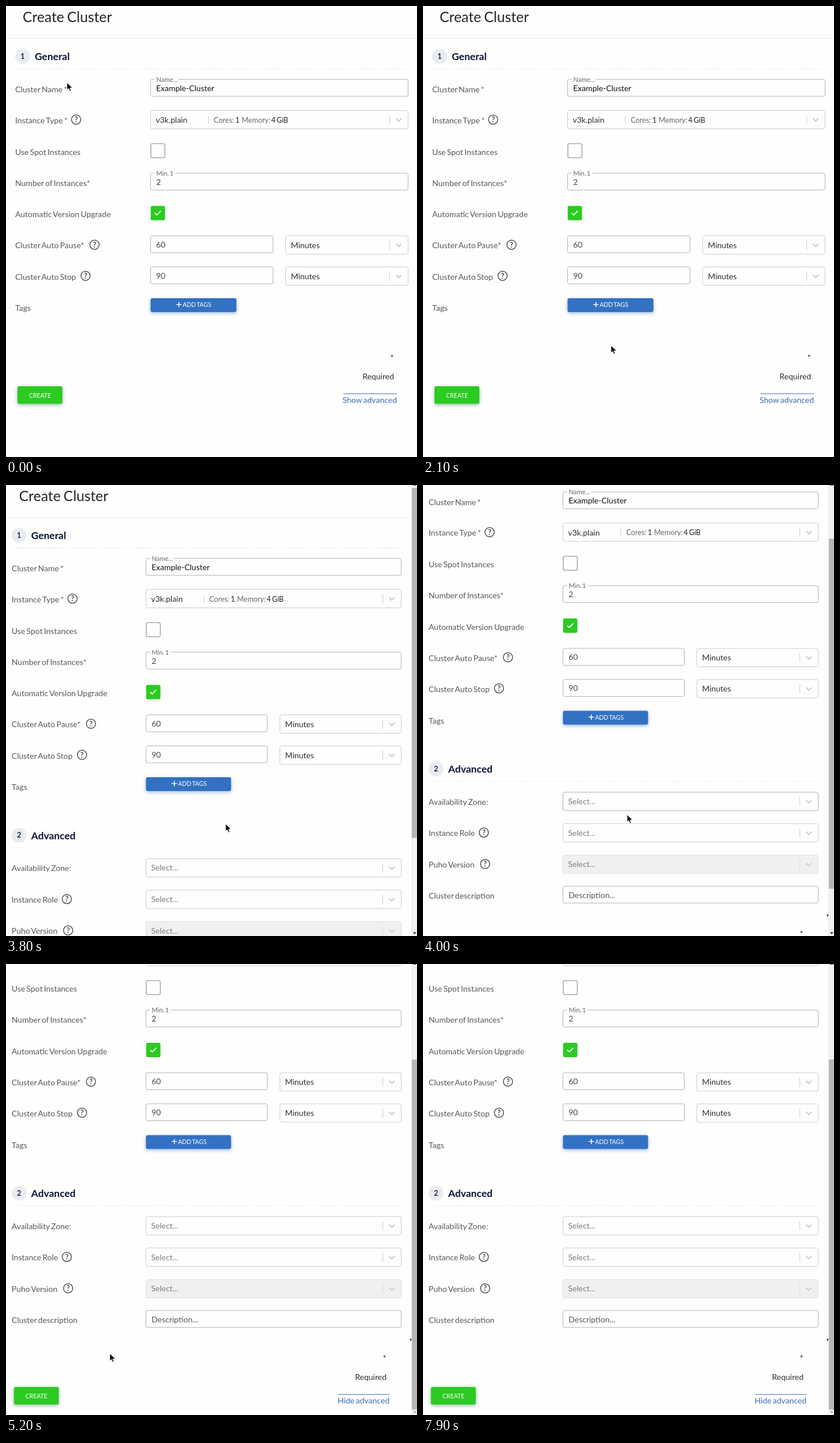
An HTML page that plays this animation: 715x784 px, repeating every 8000 ms.

```html
<!DOCTYPE html>
<html lang="en">
<head>
<meta charset="utf-8">
<title>Create Cluster</title>
<style>
  html, body { margin: 0; width: 100%; height: 100%; overflow: hidden; background: #fefefd; }
  svg { display: block; font: 14px Lato, sans-serif; word-spacing: -.09em; }
  .title { font-size: 24.8px; fill: #212529; }
  .head { font-size: 17.5px; font-weight: 700; fill: #0b1533; }
  .num { font-size: 12.6px; font-weight: 700; fill: #1c2438; text-anchor: middle; }
  .label { fill: #575757; }
  .value { fill: #484848; }
  .dark { fill: #111; }
  .pick { fill: #2e2e2e; }
  .hint { fill: #7c7c7c; }
  .legend { font-size: 11.2px; fill: #666; }
  .spec { font-size: 12.6px; fill: #666; }
  .spec.dark { fill: #222; }
  .btn { font-size: 10.5px; fill: #fff; }
  .mark { font-size: 12.5px; font-weight: 700; fill: #484848; text-anchor: middle; }
  .end { text-anchor: end; }
  .link { fill: #3b6bb5; }
  .pressed .link { fill: #27508f; }
  .box { fill: none; stroke: #b3b3b3; }
  .select { fill: none; stroke: #ccc; }
  .select.hover { stroke: #adadad; }
  .select.off { fill: #f0f0f0; stroke: #e0e0e0; }
  .thin { stroke: #ccc; fill: none; }
  .dash { stroke: #ebebeb; stroke-dasharray: 5 3; }
  .blueGlow { filter: drop-shadow(0 2px 3px rgba(51, 113, 195, .5)); }
  .greenGlow { filter: drop-shadow(0 2px 3px rgba(60, 110, 90, .5)); }
</style>
</head>
<body>
<svg id="stage" width="715" height="784" viewBox="0 0 715 784"></svg>
<script>
const text = (x, y, s, cls) => `<text x="${x}" y="${y}" class="${cls}">${s}</text>`;
const rect = (x, y, w, h, attrs) => `<rect x="${x}" y="${y}" width="${w}" height="${h}" ${attrs}/>`;
const line = (x1, y1, x2, y2, attrs) => `<path d="M${x1} ${y1}L${x2} ${y2}" ${attrs}/>`;
const frame = (x, y, w, h, cls, id = '') => rect(x, y, w, h, `rx="3" class="${cls}" id="${id}"`);

const help = (x, y) =>
  `<circle cx="${x}" cy="${y}" r="8" fill="none" stroke="#505050" stroke-width="1.5"/>` +
  text(x, y + 4.5, '?', 'mark');

const section = (n, name, left, right, y) =>
  `<circle cx="${left + 12.8}" cy="${y}" r="13" fill="#e9edf2"/>` +
  text(left + 12.8, y + 4.2, n, 'num') + text(left + 34, y + 6.5, name, 'head') +
  line(left, y + 22, right, y + 22, 'class="dash"');

const select = (x, y, right, cls = '', id) =>
  frame(x, y, right - x, 32, 'select ' + cls, id) +
  line(right - 32, y + 8.5, right - 32, y + 24.5, `class="thin" opacity="${cls ? .6 : 1}"`) +
  `<path d="M${right - 21} ${y + 14}l4.7 4.8 4.7 -4.8" class="thin" stroke-width="2"/>`;

const input = (x, y, right, value, cls = 'value') =>
  frame(x, y, right - x, 29.5, 'box') + text(x + 9.7, y + 20.3, value, cls);

// An input whose top border is interrupted by a small caption
const captioned = (x, y, right, caption, gap, value, cls) =>
  input(x, y, right, value, cls) + rect(x + 7, y - 2, gap, 4, 'fill="#fefefd"') +
  text(x + 10, y + 4.2, caption, 'legend');

function general(left, field, right) {
  const half = (right - field - 22) / 2, mid = field + half, second = right - half;
  const spec = (dx, s, cls = '') => text(field + dx, 202.5, s, 'spec ' + cls);
  const label = (y, s) => text(left, y, s, 'label');
  const duration = (y, value) =>
    input(field, y, mid, value) + select(second, y, right) + text(second + 9, y + 21.3, 'Minutes', 'pick');
  return text(left + 13, 28, 'Create Cluster', 'title') +
    section(1, 'General', left, right, 87.5) +
    label(150, 'Cluster Name *') +
    captioned(field, 127.5, right, 'Name...', 42, 'Example-Cluster', 'dark') +
    label(203.5, 'Instance Type *') + help(left + 106, 197.5) +
    select(field, 181.5, right) + text(field + 9, 203, 'v3k.plain', 'pick') +
    line(field + 100.5, 191, field + 100.5, 205, 'class="thin"') +
    spec(110, 'Cores:') + spec(147.5, '1', 'dark') + spec(158.5, 'Memory:') + spec(210, '4 GiB', 'dark') +
    label(258.5, 'Use Spot Instances') +
    rect(field + .5, 239.3, 24.5, 24.5, 'rx="3" fill="none" stroke="#aaa" stroke-width="1.6"') +
    label(312.5, 'Number of Instances*') + captioned(field, 290.5, right, 'Min. 1', 36, '2') +
    label(367, 'Automatic Version Upgrade') +
    rect(field + .2, 347.5, 25, 25, 'rx="3" fill="#2bcb22"') +
    `<path d="M${field + 7.5} 360l3.4 3.3 7 -7.2" fill="none" stroke="#fff" stroke-width="1.8"/>` +
    label(421, 'Cluster Auto Pause*') + help(left + 138, 415) + duration(399.5, '60') +
    label(475.5, 'Cluster Auto Stop') + help(left + 122.4, 469) + duration(453.5, '90') +
    label(530, 'Tags') +
    rect(field, 508, (right - field) / 3, 24, 'rx="3" fill="#3371c2" class="blueGlow"') +
    `<path d="M${field + 44.8} 519h9m-4.5 -4.5v9" stroke="#fff" stroke-width="1.5"/>` +
    text(field + 55.7, 523.3, 'ADD TAGS', 'btn');
}

const footer = (left, right, y, linkText, linkWidth) =>
  text(right - 26, y + 7.5, '*', 'end dark') + text(right - 25.5, y + 40.3, 'Required', 'end pick') +
  line(right - 20.5 - linkWidth, y + 65.5, right - 20.5, y + 65.5, 'stroke="#3b6bb5"') +
  text(right - 20.5, y + 81.3, linkText, 'end link') +
  rect(left + 4, y + 52.5, 78, 30.5, 'rx="3" fill="#2bcb22" class="greenGlow"') +
  text(left + 24, y + 72.2, 'CREATE', 'btn');

function advanced(left, field, right) {
  const label = (y, s) => text(left, y, s, 'label');
  const choose = (y, cls, id) => select(field, y, right, cls, id) + text(field + 9, y + 20.8, 'Select...', 'hint');
  return section(2, 'Advanced', left, right, 609) +
    label(671, 'Availability Zone:') + choose(649.5, '', 'zone') +
    label(725.5, 'Instance Role') + help(left + 96, 719.7) + choose(704.2, '', 'role') +
    label(780.3, 'Puho Version') + help(left + 98.3, 774.3) + choose(759, 'off') +
    label(834.5, 'Cluster description') + input(field, 812.8, right, 'Description...', 'label') +
    '<path d="M702 863.5l3 -2.5v5z" fill="#333"/>';
}

const scrollbar = rect(705, 0, 10, 784, 'fill="#f0f0f0"') +
  rect(706, 5, 9, 608.5, 'fill="#b6b6b6" id="thumb"') +
  '<path d="M708 1l3 -3 3 3z" fill="#333"/><path d="M708 777.5h6l-3 3.5z" id="down"/>';

const arrow = '<path d="M0 0V13L3 10.4 5.2 15.2 7.4 14.2 5.3 9.6 9.5 9.2Z" fill="#111" stroke="#fff" stroke-width=".8"/>';
const hand = '<path d="M-1.5 1.5q1.5 -2 3 0v6l6 1.3q2 .6 1.7 3l-1 6.5h-9l-4.5 -6q1 -2 3.8 .6z" fill="#fff" stroke="#111"/>';

document.getElementById('stage').innerHTML =
  rect(0, 0, 715, 784, 'fill="#fefefd"') +
  `<g id="short">${line(0, 56.5, 715, 56.5, 'stroke="#ececec"')}${general(16, 251.5, 699.5)}` +
  `${footer(16, 700.5, 608.5, 'Show advanced', 93)}</g>` +
  `<g id="long"><g id="page">${line(0, 56.5, 705, 56.5, 'stroke="#ececec"')}` +
  `${general(9.8, 243.5, 687.5)}${advanced(9.8, 243.5, 687.5)}` +
  `${footer(9.8, 687.5, 893.3, 'Hide advanced', 89)}` +
  `${line(578.5, 961.5, 578.5, 977.5, 'stroke="#3b6bb5" id="caret"')}</g>${scrollbar}</g>` +
  `<g id="cursor"><g id="arrow">${arrow}</g><g id="hand">${hand}</g></g>`;

const LOOP = 8000, TICK = 100;
const $ = Object.fromEntries([...document.querySelectorAll('[id]')].map(e => [e.id, e]));

// time, x, y
const pointerPath = [
  [600, 106, 133], [800, 80, 250], [1000, 330, 320], [1200, 677, 335], [1400, 260, 470], [1500, 125, 491],
  [2000, 125, 491], [2100, 327, 590], [2300, 500, 700], [2400, 570, 712], [2600, 609, 688],
  [2700, 609, 688], [2800, 605, 684], [3500, 605, 684], [3700, 440, 610], [3800, 382, 589],
  [4000, 355, 573], [4200, 360, 564], [4400, 360, 560], [4600, 210, 419], [4800, 95, 500],
  [5100, 150, 660], [5300, 211, 694], [5500, 489, 652], [5600, 489, 652], [5800, 560, 530],
  [6000, 570, 445], [6200, 514, 482], [6500, 513, 542], [6800, 485, 587], [6900, 485, 587],
  [7100, 4, 60], [7200, 15, 25]
];
const scrollPath = [[3800, 0], [3900, 55], [4000, 115.5], [4100, 180], [4200, 210.5]];

function at(path, t) {
  const i = path.findIndex(key => key[0] > t);
  if (i === 0) return path[0].slice(1);
  if (i < 0) return path[path.length - 1].slice(1);
  const a = path[i - 1], b = path[i], k = (t - a[0]) / (b[0] - a[0]);
  return a.slice(1).map((v, n) => v + (b[n + 1] - v) * k);
}

const show = (el, on) => { el.style.display = on ? '' : 'none'; };
const between = (t, from, to) => t >= from && t < to;

function draw(now) {
  const t = Math.floor(now % LOOP / TICK) * TICK;
  const [x, y] = at(pointerPath, t), [scroll] = at(scrollPath, t);
  const open = t >= 3600, pointing = between(t, 2800, 3600);
  show($.short, !open);
  show($.long, open);
  $.short.classList.toggle('pressed', t >= 3400);
  $.page.setAttribute('transform', `translate(0 ${-scroll})`);
  $.thumb.setAttribute('y', 5 + scroll * .765);
  $.down.setAttribute('fill', scroll > 200 ? '#aaa' : '#333');
  $.zone.classList.toggle('hover', between(t, 4000, 4100) || between(t, 5900, 6200));
  $.role.classList.toggle('hover', between(t, 4100, 4500) || between(t, 5800, 5900));
  show($.caret, t >= 4600 && (t - 4600) % 1200 < 600);
  $.cursor.setAttribute('transform', `translate(${x} ${y})`);
  show($.cursor, t < 7400);
  show($.arrow, !pointing);
  show($.hand, pointing);
}

const start = performance.now();
function tick() {
  draw(performance.now() - start);
  requestAnimationFrame(tick);
}
tick();
</script>
</body>
</html>
```
